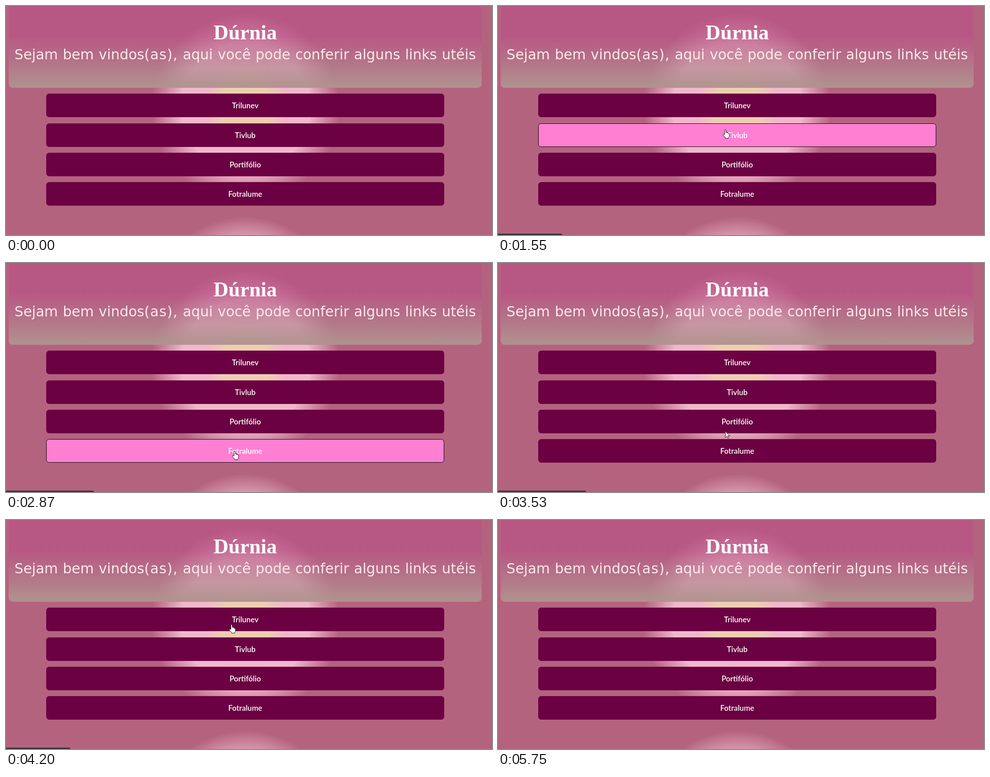
Write an HTML page that moves like this. It is 1088x515 px and loops after 6.22 s.

```html
<!DOCTYPE html>
<html lang="pt">
<meta charset="utf-8">
<style>
  html, body { margin: 0; width: 100%; height: 100%; overflow: hidden; }
  body {
    background: radial-gradient(circle at 536px 228px,
      #efcdb2 58px, #f0b8ca 92px, #f0b8ca 147px, #ecb3c6 147px, #b4637f 211px) 0 0 / 1071px 457px;
  }
  header {
    position: absolute; left: 6px; top: -2px; width: 1059px; height: 186px; border-radius: 9px;
    background: linear-gradient(rgba(186,80,135,.62) 70px, rgba(178,134,142,.68) 142px, rgba(176,146,143,.95) 180px);
  }
  svg { position: absolute; left: 0; top: 0; }
  text { fill: #fff; text-anchor: middle; }
  .title { font: bold 46.4px "Liberation Serif", serif; }
  .welcome { font: 31.2px "DejaVu Sans", sans-serif; word-spacing: .034em; fill: #fbe9ea; }
  .welcome tspan { letter-spacing: .035em; }
  .card rect { fill: #6b0042; stroke: #6b0042; }
  .card text { font: 600 17px Lato, sans-serif; }
  .card.hover rect { fill: #ff7fd3; stroke: #000; }
  #cursor path { fill: #fff; stroke: #111; stroke-linejoin: round; }
</style>
<body>
<header></header>
<svg width="1088" height="515">
  <text class="title" x="535.5" y="75">Dúrnia</text>
  <text class="welcome" x="535.5" y="120">Sejam bem vindos<tspan>(as),</tspan> aqui você pode conferir alguns links utéis</text>
  <g id="cards"></g>
  <rect id="status" x="-6" y="512" height="20" rx="3" fill="#35343a"/>
  <g id="cursor">
    <path id="arrow" d="M0 .5V14.5l3.2-3 2.3 5 2.300-1-2.300-4.800h4.300z"/>
    <path id="hand" d="M-1.500 11V1.500a1.500 1.500 0 0 1 3 0V7V5.500q1.500-.8 2.600.5V8V6.800q1.500-.6 2.500.6V9q2.200-.6 2.200 1.500v3.500q0 2-1.600 3.500v2H.2v-1.500L-5 12.500q-1.300-2.500 1-2.200z"/>
  </g>
</svg>
<script>
const LOOP = 6220, STEP = 200 / 3;
const $ = id => document.getElementById(id);
const links = [
  { name: 'Trilunev', status: 165 },
  { name: 'Tivlub', status: 144 },
  { name: 'Portifólio', status: 177 },
  { name: 'Fotralume', status: 197 }
];
const cardTop = i => Math.floor(197.8 + 66.2 * i);

$('cards').innerHTML = links.map(({ name }, i) =>
  `<g class="card" transform="translate(0 ${cardTop(i)})">
    <rect x="90.5" y=".5" width="890" height="52" rx="6"/><text x="535.5" y="33">${name}</text></g>`).join('');
const cards = [...document.querySelectorAll('.card')];

// Pointer moves: start and end time, then where the move ends
const entry = [1020, 472];
const moves = [
  [318, 451, 600, 215], [451, 585, 459, 135], [585, 851, 430, 60],
  [918, 1200, 500, 240], [1333, 1600, 512, 290],
  [1933, 2060, 513, 331], [2200, 2333, 515, 362],
  [2467, 2867, 512, 423], [3200, 3867, 505, 310], [3867, 4200, 505, 235],
  [4800, 5067, 600, 250], [5067, 5200, 797, 346], [5200, 5467, 990, 481], [5467, 5667, 1036, 505]
];

function pointer(t) {
  return moves.reduce(([px, py], [start, end, x, y]) => {
    const f = Math.min(1, Math.max(0, (t - start) / (end - start)));
    return [px + (x - px) * f, py + (y - py) * f];
  }, entry);
}

function cardUnder([x, y]) {
  return x < 90 || x > 981 ? -1 : links.findIndex((_, i) => y >= cardTop(i) && y <= cardTop(i) + 53);
}

// The highlight trails the pointer by one step
const hovered = t => cardUnder(pointer(t - STEP));

// The status bar keeps the last highlighted link
function statusWidth(t) {
  if (t < 1470 || t >= 5745) return 0;
  while (hovered(t) < 0) t -= STEP / 2;
  return links[hovered(t)].status + 6;
}

function draw(t) {
  const start = t < 1200 ? 318 : 1200;
  const held = start + Math.floor((t - start) / STEP) * STEP;
  const active = hovered(held);
  const hand = cardUnder(pointer(held - STEP / 2)) >= 0;
  cards.forEach((card, i) => card.classList.toggle('hover', i === active));
  $('status').setAttribute('width', statusWidth(t < 1470 ? t : Math.min(t, held + (t >= 5745 ? LOOP : 0))));
  $('cursor').setAttribute('transform', `translate(${pointer(held).map(Math.round)})`);
  $('cursor').style.display = t >= 320 && t < 5745 ? '' : 'none';
  $('hand').style.display = hand ? '' : 'none';
  $('arrow').style.display = hand ? 'none' : '';
}

const begin = performance.now();
(function tick() {
  draw((performance.now() - begin) % LOOP);
  requestAnimationFrame(tick);
})();
</script>
</body>
</html>
```
